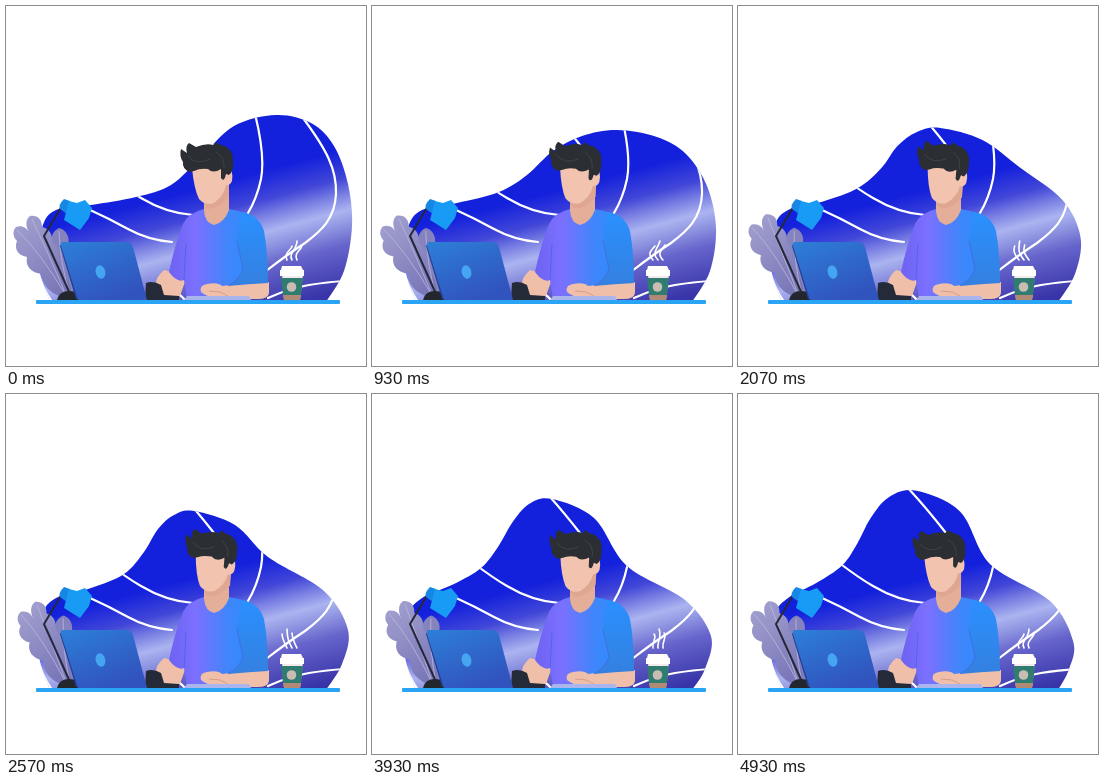
Animation, 360 px wide and 360 px high, one loop 5 s. Source, as an HTML page:

```html
<!DOCTYPE html>
<html lang="en">
<head>
<meta charset="utf-8">
<title>Working at a desk</title>
<style>
  html, body { margin: 0; width: 100%; height: 100%; overflow: hidden; background: #fff; }
  svg { display: block; width: 100%; height: 100%; }
  .line { fill: none; stroke: #fff; stroke-width: 2.2; stroke-linecap: round; }
</style>
</head>
<body>
<svg viewBox="0 0 360 360">
  <defs>
    <linearGradient id="sky" gradientUnits="userSpaceOnUse" x1="190" y1="170" x2="229" y2="315">
      <stop offset=".08" stop-color="#1320dc"/>
      <stop offset=".27" stop-color="#4247d8"/>
      <stop offset=".37" stop-color="#777de2"/>
      <stop offset=".48" stop-color="#abb4f0"/>
      <stop offset=".58" stop-color="#8d92e0"/>
      <stop offset=".7" stop-color="#6765cc"/>
      <stop offset="1" stop-color="#3733a8"/>
    </linearGradient>
    <linearGradient id="shirt">
      <stop offset="0" stop-color="#6f62f2"/>
      <stop offset=".28" stop-color="#7b70ff"/>
      <stop offset=".62" stop-color="#3f86fb"/>
      <stop offset="1" stop-color="#2290ff"/>
    </linearGradient>
    <linearGradient id="sleeve" x2="0" y2="1">
      <stop offset="0" stop-color="#2a90ff"/>
      <stop offset="1" stop-color="#3480e0"/>
    </linearGradient>
    <linearGradient id="lid" x2=".6" y2="1">
      <stop offset="0" stop-color="#2d7fd8"/>
      <stop offset="1" stop-color="#3153bd"/>
    </linearGradient>
    <linearGradient id="leaf" x2=".6" y2="1">
      <stop offset="0" stop-color="#a5a3d0"/>
      <stop offset="1" stop-color="#7a78b8"/>
    </linearGradient>
    <clipPath id="inside"><path id="edge"/></clipPath>
  </defs>

  <g clip-path="url(#inside)">
    <rect width="360" height="296" fill="url(#sky)"/>
    <g class="line">
      <path d="M249 108C255 132 258 157 255 173Q251 192 242 207"/>
      <path d="M297 112C320 143 331 163 330 188C329 213 315 225 299 237Q282 248 260 265"/>
      <path d="M100 168Q121 184 135 192Q160 207 187 209"/>
      <path d="M168 92Q186 111 208 139"/>
      <path d="M82 203Q102 212 122 223T166 236"/>
      <path d="M262 292Q284 282 303 279T338 275"/>
      <path d="M162 281Q172 286 180 295"/>
      <path d="M31 262Q36 282 46 296"/>
    </g>
  </g>

  <g id="plant">
    <path fill="#8583bd" d="M61 291C50 276 42 262 46 245C43 234 46 225 53 222C61 224 64 232 62 239C70 246 70 254 67 260C73 272 70 284 66 292Z"/>
    <path fill="url(#leaf)" d="M60 292C43 288 36 278 36 268C25 267 19 260 21 251C11 249 8 242 11 235C6 230 7 224 10 221C16 219 21 222 23 227C19 219 20 213 24 210C32 209 36 214 36 221C43 222 47 229 46 236C54 244 54 252 53 258C61 266 65 279 66 291Z"/>
    <path fill="none" stroke="#b9b8dc" stroke-width=".8" d="M11 224Q34 246 61 291M26 213Q39 240 61 291M53 225Q54 256 64 290"/>
  </g>

  <g id="lamp">
    <path fill="none" stroke="#25283a" stroke-width="2" d="M56 200L38 230L65 290"/>
    <path fill="#24262e" d="M51 294Q53 285 63 285T74 294Z"/>
    <path fill="#1787e6" d="M58 193L64 195L61 208L54 203Q52 199 58 193Z"/>
    <path fill="#189bf5" d="M63 195L71 197L79 194L86 202L83 212L74 224L58 214Z"/>
  </g>

  <g id="person">
    <path fill="#efbfa9" d="M158 264Q149 272 150 279L156 290H174L181 270Z"/>
    <path fill="url(#shirt)" d="M198 203Q182 207 177 218Q169 238 163 266Q171 277 178 274L181 293H252L259 262Q261 221 248 211Q237 205 222 203Z"/>
    <path fill="#e5ae98" d="M198 184H223V204Q218 217 208 219Q199 217 198 205Z"/>
    <path fill="#efbfa9" d="M224 279L263 276V287Q262 293 252 293H214Q200 291 195 286Q193 279 201 278Q212 276 216 280Z"/>
    <path fill="none" stroke="#d99e89" d="M203 285L214 286L222 290"/>
    <path fill="url(#sleeve)" d="M236 206Q253 209 258 225Q262 247 262 277Q243 278 222 280Q234 273 237 263L231 235Z"/>
    <path fill="none" stroke="#4867d8" stroke-width=".8" d="M231 235L237 263Q234 273 222 280M180 238L178 274"/>
    <path fill="#252a39" d="M140 277Q147 274 155 279L158 289L173 290V294H139Z"/>
    <path fill="#a9b5ec" d="M181 290H243L245 294H178Z"/>
  </g>

  <g id="head">
    <path fill="#dfa792" d="M198 180L223 174V190Q214 202 203 203L198 199Z"/>
    <path fill="#f2c4b0" d="M186 162L221 156Q228 165 226 175Q224 180 220 179Q218 190 208 197Q199 200 193 193Q188 183 186 162Z"/>
    <path fill="#2b2e32" d="M183 166Q176 162 177 156Q173 150 175 143L181 147Q179 140 183 137L190 141Q200 137 207 139L210 136Q213 139 219 140Q228 145 227 156Q228 165 223 169L220 168Q218 177 215 172L215 163Q207 168 202 163Q194 162 188 165Z"/>
    <path fill="none" stroke="#44484b" stroke-width=".8" d="M182 150Q190 160 204 153M210 146Q219 151 218 162"/>
  </g>

  <g id="laptop">
    <path fill="#233f96" d="M54 240L56 237L76 293H70Z"/>
    <path fill="url(#lid)" d="M57 236L120 236Q125 236 127 241L141 294H72L55 240Q54 236 57 236Z"/>
    <ellipse cx="94.5" cy="266" rx="4.8" ry="6.8" fill="#46a5f1" transform="rotate(-15 94.5 266)"/>
  </g>

  <g id="cup">
    <path fill="#f2ebe9" d="M276 268H297L294 294H278Z"/>
    <path fill="#317c70" d="M275 272H297L295 289H277Z"/>
    <path fill="#b18a75" d="M277 289H295L294 294H278Z"/>
    <circle cx="285.5" cy="281" r="4.8" fill="#c9bcb2"/>
    <path fill="#fff" d="M276 260H295L297 264H298V270H274V264H275Z"/>
  </g>
  <g class="line" id="steam" stroke-width="1.6"></g>

  <rect x="30" y="294" width="304" height="4" rx="1" fill="#2aa4f5"/>
</svg>
<script>
const LOOP = 5000;
const byId = id => document.getElementById(id);
const [edge, head, plant, steam] = ['edge', 'head', 'plant', 'steam'].map(byId);

// Moving outline points, left to right, at each time
const poses = [
  [0,    85,199, 130,191, 165,179, 195,151, 228,120, 270,109, 305,117, 328,140, 342,178, 346,220, 338,265],
  [930,  85,197, 127,186, 155,169, 181,145, 210,130, 245,124, 285,131, 314,148, 335,180, 344,222, 338,265],
  [1570, 85,197, 122,184, 148,167, 167,145, 190,131, 217,127, 260,137, 302,160, 331,191, 343,226, 338,266],
  [2570, 85,194, 118,180, 138,158, 152,135, 168,121, 188,117, 229,131, 262,163, 318,197, 342,236, 336,270],
  [3930, 82,190, 109,174, 126,153, 140,129, 157,110, 180,105, 222,124, 255,172, 313,206, 339,242, 333,275],
  [5000, 78,189, 104,171, 119,149, 132,124, 150,103, 177,96,  222,117, 252,170, 312,207, 335,248, 331,275]
];

function outline(t) {
  const i = poses.findIndex(p => p[0] > t);
  const a = poses[i - 1], b = poses[i], k = (t - a[0]) / (b[0] - a[0]);
  const pts = [[44, 296], [33, 262], [36, 222], [50, 204]];
  for (let j = 1; j < a.length; j += 2)
    pts.push([a[j] + (b[j] - a[j]) * k, a[j + 1] + (b[j + 1] - a[j + 1]) * k]);
  pts.push([320, 296]);
  return smooth(pts);
}

// Catmull-Rom spline as cubic segments
function smooth(p) {
  let d = `M${p[0]}`;
  for (let i = 0; i < p.length - 1; i++) {
    const q = p[i], r = p[i + 1], before = p[i - 1] || q, after = p[i + 2] || r;
    const c1 = q.map((v, n) => v + (r[n] - before[n]) / 6);
    const c2 = r.map((v, n) => v - (after[n] - q[n]) / 6);
    d += `C${c1} ${c2} ${r}`;
  }
  return d + 'Z';
}

function wisps(t) {
  const lean = 5 * Math.cos(2 * Math.PI * t / LOOP);
  const bend = 3 * Math.sin(2 * Math.PI * t / LOOP);
  const wisp = (x, top) =>
    `<path stroke-width="1.6" d="M${x} 254C${x - 4 - bend} 247 ${x + lean - bend} 244 ${x + lean} ${top}"/>`;
  return wisp(281, 240) + wisp(286, 235) + wisp(291, 239);
}

function draw(now) {
  const t = now % LOOP;
  edge.setAttribute('d', outline(t));
  head.setAttribute('transform', `rotate(${5.2 * Math.sin(Math.PI * t / LOOP)} 208 202)`);
  plant.setAttribute('transform', `rotate(${2.5 * (1 - Math.cos(Math.PI * t / 4000))} 62 292)`);
  steam.innerHTML = wisps(t);
  requestAnimationFrame(draw);
}
draw(0);
</script>
</body>
</html>
```
